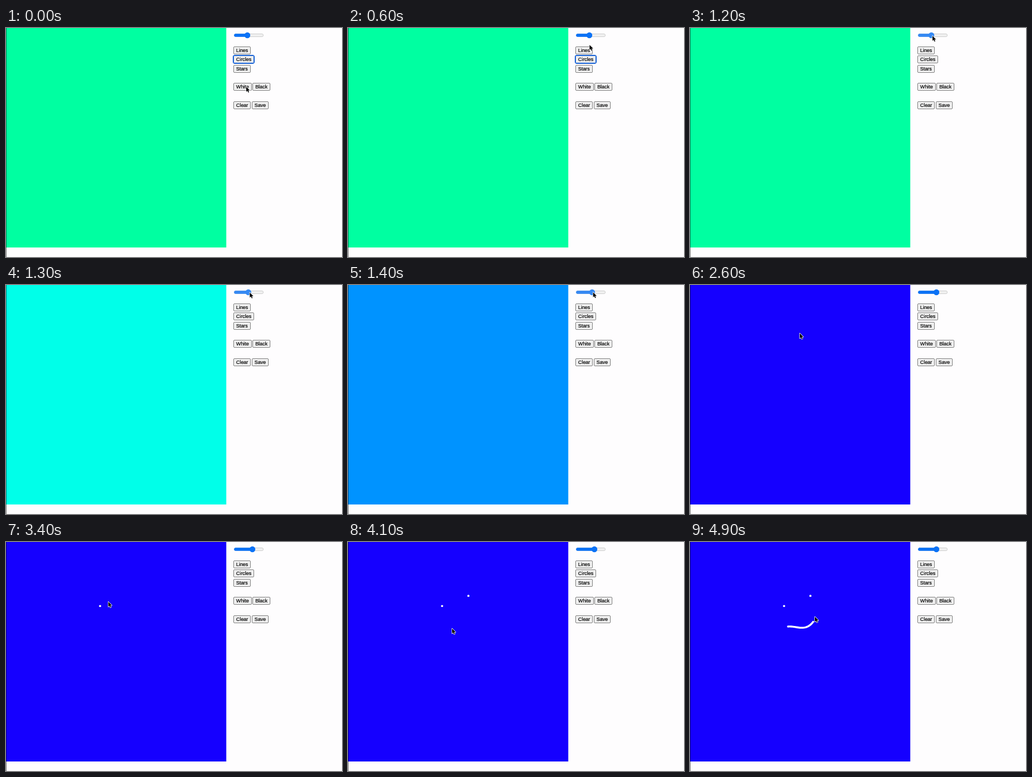
Write an HTML page with a canvas that moves like this. It is 600 by 409 pixels and loops after 5000 ms.

```html
<!DOCTYPE html>
<html lang="en">
<head>
<meta charset="utf-8">
<title>Drawing pad</title>
<style>
  html, body { margin: 0; width: 100%; height: 100%; overflow: hidden; background: #fefdfe; }
  canvas { position: absolute; left: 0; top: 0; width: 600px; height: 409px; }
  .row { position: absolute; left: 406px; display: flex; gap: 1.5px; }
  .btn {
    box-sizing: border-box; height: 14px; padding: 0 4px;
    border: 1px solid #808080; border-radius: 2px; background: #efefef; color: #000;
    font: 8.9px/12px "Liberation Sans", Arial, sans-serif; white-space: nowrap;
    -webkit-text-stroke: 0.2px #000;
  }
  .focus { border-color: #1560d4; outline: 1px solid #1560d4; }
</style>
</head>
<body>
<script>
const LOOP = 5000, STEP = 100;
const ROW_TOP = 33, ROW_PITCH = 16.3;

const rows = ['Lines', 'Circles', 'Stars', '', 'White Black', '', 'Clear Save'];
rows.forEach((labels, i) => {
  const row = document.createElement('div');
  row.className = 'row';
  row.style.top = ROW_TOP + i * ROW_PITCH + 'px';
  for (const label of labels.split(' ').filter(Boolean)) {
    const el = document.createElement('div');
    el.className = 'btn';
    el.id = label;
    el.textContent = label;
    row.append(el);
  }
  document.body.append(row);
});
const circles = document.getElementById('Circles');

const canvas = document.createElement('canvas');
const dpr = window.devicePixelRatio || 1;
canvas.width = 600 * dpr;
canvas.height = 409 * dpr;
document.body.append(canvas);
const ctx = canvas.getContext('2d');

// Pointer moves: each axis eases out with its own power
const home = { x: 429, y: 105 };
const moves = [
  { from: 0, to: 100, x: 428, y: 63 },
  { from: 200, to: 800, x: 433, y: 14 },
  { from: 1200, to: 1500, x: 440, y: 12.5 },
  { from: 1700, to: 2000, x: 428, y: 34 },
  { from: 2200, to: 2800, x: 167, y: 112.5, powX: 2 },
  { from: 3200, to: 3800, x: 214, y: 95 },
  { from: 3800, to: 4300, x: 167, y: 156, powY: 4 },
  { from: 4300, to: 4400, x: 175, y: 151 }
];
const smile = { from: 4400, to: 4800, x: [175, 190, 206, 220], y: [151, 149.5, 161, 142.5] };
const lift = { from: 4800, to: 4900, x: 223, y: 133.5 };

const progress = (t, m) => Math.min(1, Math.max(0, (t - m.from) / (m.to - m.from)));
const easeOut = (p, pow = 1) => 1 - (1 - p) ** pow;

function bezier([a, b, c, d], p) {
  const q = 1 - p;
  return a * q ** 3 + 3 * b * q * q * p + 3 * c * q * p * p + d * p ** 3;
}
const smileAt = p => ({ x: bezier(smile.x, p), y: bezier(smile.y, p) });

function moveTo(pos, m, t) {
  const p = progress(t, m);
  return {
    x: pos.x + (m.x - pos.x) * easeOut(p, m.powX),
    y: pos.y + (m.y - pos.y) * easeOut(p, m.powY)
  };
}

function pointerAt(t) {
  if (t >= smile.from) return moveTo(smileAt(progress(t, smile)), lift, t);
  return moves.reduce((pos, m) => moveTo(pos, m, t), home);
}

const thumbAt = t => 431 + 9 * progress(t, { from: 1200, to: 1500 }) ** 1.5;

function disc(x, y, r, color) {
  ctx.fillStyle = color;
  ctx.beginPath();
  ctx.arc(x, y, r, 0, Math.PI * 2);
  ctx.fill();
}

function pill(w, fill, stroke) {
  ctx.beginPath();
  ctx.roundRect(407.5, 10.5, w, 5, 2.5);
  ctx.fillStyle = fill;
  ctx.fill();
  ctx.strokeStyle = stroke;
  ctx.lineWidth = 0.6;
  ctx.stroke();
}

function drawBoard(thumb) {
  const hue = 158 + 9.67 * (thumb - 431);
  ctx.fillStyle = `hsl(${hue} 100% 50%)`;
  ctx.fillRect(0, 0, 393.35, 392);
  ctx.fillStyle = 'rgba(0, 0, 0, 0.5)';
  ctx.fillRect(0, 0, 1, 409);
}

function drawSlider(t, thumb) {
  let color = '#0b72f6';
  if (t >= 700 && t < 900) color = '#0a5fcb';
  if (t >= 900 && t < 1800) color = '#3589f3';
  pill(52, '#f0f0f0', '#b4b4b4');
  pill(thumb - 407.5, color, color);
  disc(thumb, 13, 5.2, color);
}

function drawMarks(t) {
  if (t >= 3000) disc(168, 114.3, 1.9, '#fff');
  if (t >= 3800) disc(215, 96.2, 1.9, '#fff');
  const end = progress(t, smile);
  if (!end) return;
  ctx.beginPath();
  for (let i = 0; i <= 24; i++) {
    const { x, y } = smileAt(end * i / 24);
    ctx.lineTo(x, y);
  }
  ctx.strokeStyle = '#fff';
  ctx.lineWidth = 3.4;
  ctx.lineCap = ctx.lineJoin = 'round';
  ctx.stroke();
}

const arrow = new Path2D('M0 0V10L2.3 7.9L3.9 11.5L5.6 10.7L4 7.2H7.1Z');

function drawPointer({ x, y }) {
  ctx.save();
  ctx.translate(x, y);
  ctx.scale(0.9, 0.9);
  ctx.lineJoin = 'round';
  ctx.strokeStyle = '#fff';
  ctx.lineWidth = 1.6;
  ctx.stroke(arrow);
  ctx.fillStyle = '#000';
  ctx.fill(arrow);
  ctx.restore();
}

function render(now) {
  const t = Math.floor(now % LOOP / STEP) * STEP;
  const thumb = thumbAt(t);
  ctx.setTransform(dpr, 0, 0, dpr, 0, 0);
  ctx.clearRect(0, 0, 600, 409);
  circles.classList.toggle('focus', t < 900);
  drawBoard(thumb);
  drawSlider(t, thumb);
  drawMarks(t);
  drawPointer(pointerAt(t));
}

const start = performance.now();
function tick() {
  render(performance.now() - start);
  requestAnimationFrame(tick);
}
tick();
</script>
</body>
</html>
```
